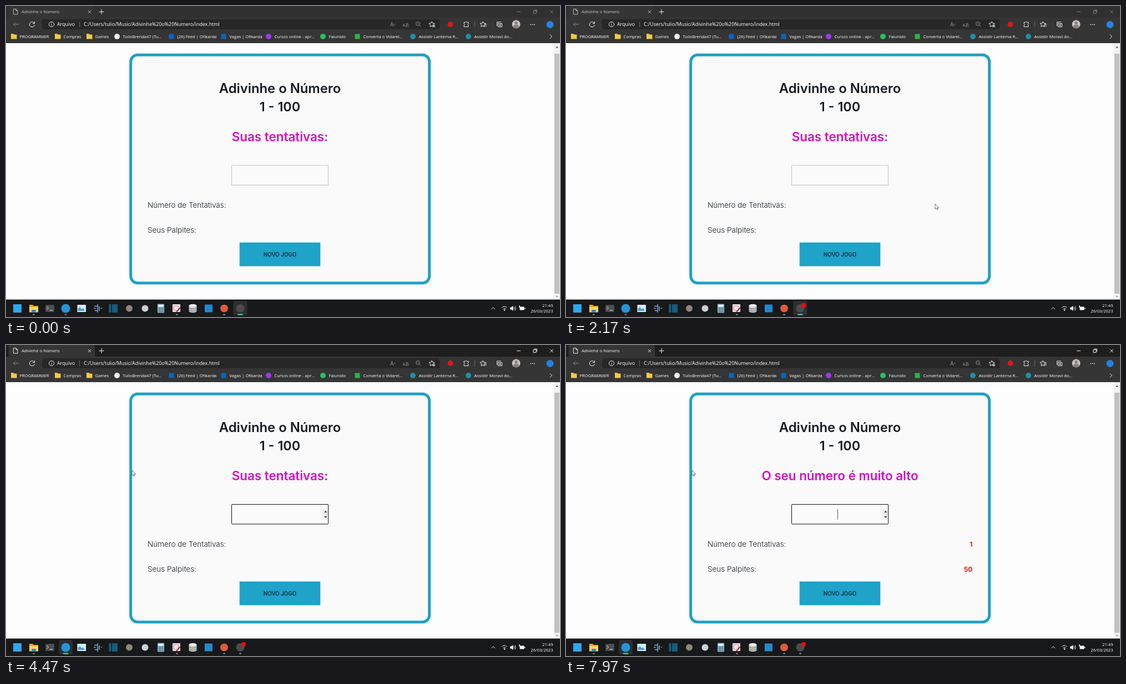
An HTML page that plays this animation: 998 px wide and 561 px high, repeating every 8000 ms.

```html
<!DOCTYPE html>
<html lang="pt">
<head>
<meta charset="utf-8">
<title>Adivinhe o Número</title>
<style>
  html, body { margin: 0; width: 100%; height: 100%; overflow: hidden; background: #fdfdfd; }
  svg { display: block; width: 100vw; height: 100vh; }
  text { white-space: pre; }
  .ui { font-family: "Open Sans", "Noto Sans", sans-serif; font-size: 7.6px; fill: #fff; }
  .page { font-family: Inter, sans-serif; fill: #141a22; }
  .mid { text-anchor: middle; }
  .line { fill: none; stroke: #eee; stroke-width: 1; }
  .dim { opacity: .45; }
  .label { font-size: 13.5px; font-weight: 300; }
  .value { font-size: 12.4px; font-weight: 600; fill: #e3060f; text-anchor: end; }
</style>
</head>
<body>
<svg viewBox="0 0 998 561">
  <!-- tab strip -->
  <rect id="strip" width="998" height="24"/>
  <path d="M3 22q2 0 2-3V4q0-4 4-4H156q4 0 4 4V19q0 3 3 3z" fill="#353535"/>
  <g class="ui">
    <g id="tabTitle">
      <path class="line" d="M13.500 5.500h4.500l3 3v6.500h-7.500zM18 5.500v3h3"/>
      <text x="28" y="13">Adivinhe o Número</text>
      <path class="line" d="M148 8l5 5m0-5l-5 5"/>
    </g>
    <path id="windowButtons" class="line" d="M920 10.500h7M950 8.500h5v5h-5zM951.500 7h5v5M980 7.500l6 6m0-6l-6 6"/>
  </g>
  <path class="line" d="M167.500 10.500h9M172 6v9"/>

  <!-- toolbar -->
  <rect y="21" width="998" height="46" fill="#353535"/>
  <rect x="65" y="24" width="716" height="18" rx="4" fill="#272727"/>
  <path class="line dim" d="M23 33H13.500m4-4l-4 4l4 4"/>
  <path class="line" d="M51 31a4.600 4.600 0 1 0 .5 3M51.500 28v3.500H48"/>
  <circle class="line" cx="82" cy="33" r="4.500"/>
  <path class="line" d="M82 32.500v3M82 30v1"/>
  <text class="ui" x="92" y="36.300" style="font-size:8.900px">Arquivo</text>
  <path d="M132.500 28v10M844.500 28v10" stroke="#666"/>
  <text class="ui" x="140" y="36.300" style="font-size:8.900px">C:/Users/tulio/Music/Adivinhe%20o%20Numero/index.html</text>
  <g opacity=".5">
    <text class="ui" x="692" y="37" style="font-size:10px">A<tspan dy="-2" font-size="7">»</tspan></text>
    <text class="ui" x="714" y="36.500" style="font-family:'Noto Sans CJK JP','Noto Sans CJK',sans-serif;font-size:8px">aあ</text>
    <circle class="line" cx="742" cy="32" r="3.500"/>
    <path class="line" d="M740.500 32h3M744.500 34.500l3 3"/>
  </g>
  <path id="star" class="line" d="M767 28l1.500 3l3.500.500l-2.500 2.500l.500 3.500l-3-1.700l-3 1.700l.500-3.500l-2.500-2.500l3.500-.500z"/>
  <use href="#star" x="92"/>
  <path class="line" d="M862 33h4M862 36h4"/>
  <circle cx="770.500" cy="36" r="2.500" fill="#aaa"/>
  <circle cx="800.500" cy="33" r="5" fill="#e2131b"/>
  <path class="line" d="M825 29.500h2.500q1.500-3 3 0h2.500v2.500q-3 1.500 0 3v2.500h-8v-2.500q3-1.500 0-3z"/>
  <path class="line" d="M886.500 31.500h7v6h-7zM884.500 36v-7h7M890 32.500v4M888 34.500h4"/>
  <circle cx="919" cy="33" r="7.500" fill="#c9c5c3"/>
  <path d="M913.500 38a5.500 4.500 0 0 1 11 0a7.500 7.500 0 0 1-11 0" fill="#85807e"/>
  <circle cx="919" cy="30.500" r="2.700" fill="#85807e"/>
  <path d="M944.500 33.500h1.600m1.700 0h1.600m1.700 0h1.600" stroke="#eee" stroke-width="1.600"/>
  <circle cx="980" cy="33.500" r="6.500" fill="#2583e0"/>
  <g id="bookmarks"></g>
  <path class="line" d="M980 51.500l3.500 3.500l-3.500 3.500"/>

  <!-- page -->
  <rect y="67" width="998" height="463" fill="#fdfdfd"/>
  <rect x="987" y="67" width="11" height="463" fill="#f1f1f1"/>
  <rect x="988" y="86" width="9" height="433" fill="#c1c1c1"/>
  <path d="M990 75.500l2.500-3l2.500 3z" fill="#555"/>
  <path d="M990 523l2.500 3l2.500-3z" fill="#aaa"/>
  <rect x="224.700" y="88.200" width="538" height="411.600" rx="12.500" fill="#fafafa" stroke="#1fa1c7" stroke-width="5"/>
  <g class="page">
    <g class="mid" font-weight="600">
      <text x="493.500" y="157" font-size="23.800">Adivinhe o Número</text>
      <text x="493.500" y="190" font-size="23.400">1 - 100</text>
      <text id="message" x="493.500" y="244" font-size="22.400" fill="#d60dc5"></text>
    </g>
    <rect id="field" x="406.500" y="287.500" width="174" height="35.500" fill="#fbfbfb"/>
    <text id="typed" class="mid" x="489" y="309.500" font-size="13"></text>
    <path id="caret" d="M489.500 296v19" stroke="#555"/>
    <g id="spinner">
      <rect x="571" y="296" width="9" height="19" fill="#efefef"/>
      <path d="M573 302l2.700-3l2.700 3zM573 309l2.700 3l2.700-3z" fill="#333"/>
    </g>
    <text class="label" x="255" y="364">Número de Tentativas:</text>
    <text class="label" x="255" y="409">Seus Palpites:</text>
    <g id="results">
      <text class="value" x="732.500" y="364">1</text>
      <text class="value" x="732.500" y="409">50</text>
    </g>
    <rect x="420.700" y="426.600" width="145.600" height="42.800" fill="#1fa3c8"/>
    <text class="mid" x="493.500" y="451.600" font-size="9.800" font-weight="500">NOVO JOGO</text>
  </g>

  <!-- taskbar -->
  <rect y="529.500" width="998" height="31.500" fill="#18191b"/>
  <rect id="activeTile" x="-12.500" y="532" width="25" height="26" rx="3" fill="#2d2e30"/>
  <rect x="13" y="538" width="15" height="15" fill="#2ea8ee"/>
  <path d="M42 539h6l2 2h8v11H42z" fill="#e5a823"/>
  <path d="M42 543h16v9.500H42z" fill="#ffd75e"/>
  <path d="M46 548h8v4.500h-8z" fill="#3486d2"/>
  <rect x="71" y="539" width="16" height="13" rx="1.500" fill="#4b4d4f"/>
  <path class="line" d="M73.500 542l3 3l-3 3M79 549h5"/>
  <circle cx="107.500" cy="545.500" r="8" fill="#2594d8"/>
  <rect x="128.500" y="539" width="15.500" height="13" fill="#d8eefa"/>
  <path d="M130 550v-4l3-3l3 4l3-2l3 5z" fill="#4a9bcc"/>
  <path d="M158 545.500h4m-3-4h6m-5 8h6M165 538v15m3-11v8m3-5h2" stroke="#7fa4d0" stroke-width="1.600"/>
  <path d="M185.500 538h4v15h-4zM191 538h10v15h-10z" fill="#155e7c"/>
  <circle cx="222" cy="545.500" r="6" fill="#8b877e"/>
  <circle cx="250.500" cy="545.500" r="6" fill="#d0d0d2"/>
  <rect x="273" y="537.500" width="12" height="16" rx="1" fill="#8fb4cb"/>
  <rect x="274.500" y="539" width="9" height="3.500" fill="#e9f5fb"/>
  <path d="M275 545h8.500M275 548h8.500M275 551h8.500" stroke="#24516f" stroke-width="1.600" stroke-dasharray="2 1.200"/>
  <rect x="300" y="538" width="14" height="14" rx="1" fill="#e9e9ee"/>
  <path d="M302 541h9v8h-9z" fill="none" stroke="#d63b42" stroke-dasharray="2 1"/>
  <path d="M307 552l7-8" stroke="#b22c43" stroke-width="2"/>
  <path d="M329.500 540.500v10a7 2.800 0 0 0 14 0v-10z" fill="#c4c4c4"/>
  <ellipse cx="336.500" cy="540.500" rx="7" ry="2.800" fill="#eee"/>
  <path d="M329.500 544a7 2.500 0 0 0 14 0m-14 4a7 2.500 0 0 0 14 0" fill="none" stroke="#777"/>
  <rect x="358" y="538.500" width="14" height="14" fill="#2489ca"/>
  <circle cx="393" cy="545.500" r="7" fill="#df5a3d"/>
  <circle cx="422" cy="545.500" r="7.500" fill="#4b4b4e"/>
  <circle id="recording" cx="428" cy="540" r="4" fill="#ff0a12"/>
  <g id="running" fill="#999"></g>
  <rect id="activeBar" x="-5" y="555.500" width="10" height="2.200" rx="1" fill="#3ed292"/>
  <path class="line" d="M874.500 547l3.200-3.200l3.200 3.200"/>
  <path class="line" d="M893.500 544q4.500-4 9 0M895.500 546.500q2.500-2.300 5 0"/>
  <circle cx="898" cy="548.500" r="1.200" fill="#fff"/>
  <path d="M908 543.500h2.500l3-2.500v9l-3-2.500H908z" fill="#fff"/>
  <path class="line" d="M915 543.500q1.500 2 0 4M916.800 541.500q3 4 0 8"/>
  <rect x="925.500" y="542.500" width="8" height="6" rx="1" fill="#fff"/>
  <path d="M934 544.500h1.500v2H934z" fill="#fff"/>
  <path d="M925 540v4" stroke="#fff" stroke-width="1.500"/>
  <g class="ui" text-anchor="end">
    <text x="985.500" y="542.500">21:49</text>
    <text x="985.500" y="553">26/03/2023</text>
  </g>

  <!-- pointers -->
  <path id="arrow" d="M0 0v9.500l2.200-2l1.500 3.200l1.500-.700l-1.500-3h3z" fill="#fff" stroke="#333" stroke-width=".7"/>
  <path id="beam" d="M-2-4.500h1.300l.700.700l.700-.700H2M0-4v8M-2 4.500h1.300l.700-.700l.700.700H2" fill="none" stroke="#777" stroke-width=".8"/>
</svg>
<script>
const LOOP = 8000, RECORD = 350, FOCUS = 3500, KEYS = [5000, 5220], SUBMIT = 5700, BLINK = 500;
// Pointer tip: time, x, y
const PATH = [[1750, 1000, 410], [2170, 665, 357], [2800, 486, 305], [3620, 486, 305], [4150, 227, 226]];
const $ = id => document.getElementById(id);
const show = (id, on) => $(id).setAttribute('visibility', on ? 'visible' : 'hidden');
const move = (id, x, y = 0) => $(id).setAttribute('transform', `translate(${x} ${y})`);

const folder = x => `<path d="M${x - 5} 50h4l1.500 1.500h5v8h-10.500z" fill="#f4c84c"/>`;
const disc = color => x => `<circle cx="${x}" cy="55" r="5" fill="${color}"/>`;
const square = color => x => `<rect x="${x - 4.5}" y="50.500" width="9" height="9" fill="${color}"/>`;
const bookmarks = [
  [14, folder, 'PROGRAMMER'], [93, folder, 'Compras'], [150, folder, 'Games'],
  [200, disc('#f4f4f4'), 'TulioBrenda47 (Tu...'],
  [298, square('#0a66c2'), '(26) Feed | Ofikarda'],
  [392, square('#0a66c2'), 'Vagas | Ofikarda'],
  [473, disc('#a435f0'), 'Cursos online - apr...'],
  [571, disc('#25c15b'), 'Falunido'],
  [633, square('#2fb344'), 'Converta o Vidarel...'],
  [733, disc('#1e8fae'), 'Assistir Lanterna R...'],
  [833, disc('#1e8fae'), 'Assistir Moravi do...']
];
$('bookmarks').innerHTML = bookmarks.map(([x, icon, name]) =>
  icon(x) + `<text class="ui" x="${x + 10.5}" y="57.800">${name}</text>`).join('');
$('running').innerHTML = [50, 107.5, 308, 393, 422].map(x =>
  `<rect x="${x - 2}" y="555.800" width="4" height="1.800" rx=".9"/>`).join('');

function pointerAt(t) {
  const next = PATH.findIndex(p => p[0] > t);
  if (next < 0) return PATH[PATH.length - 1].slice(1);
  if (next === 0) return null;
  const [t0, x0, y0] = PATH[next - 1], [t1, x1, y1] = PATH[next];
  const u = (t - t0) / (t1 - t0), e = u * u * (3 - 2 * u);
  return [x0 + (x1 - x0) * e, y0 + (y1 - y0) * e];
}

function draw(t) {
  const focused = t >= FOCUS, submitted = t >= SUBMIT;
  const typed = submitted ? '' : '50'.slice(0, KEYS.filter(k => t >= k).length);
  const lastInput = [FOCUS, ...KEYS, SUBMIT].filter(k => t >= k).pop();
  const pointer = pointerAt(t);
  const hover = !!pointer && pointer[0] > 406 && pointer[0] < 581 && pointer[1] > 287 && pointer[1] < 323;

  $('strip').setAttribute('fill', focused ? '#1e1e1e' : '#303030');
  $('tabTitle').setAttribute('opacity', focused ? 1 : .75);
  $('windowButtons').setAttribute('opacity', focused ? 1 : .4);
  const task = focused ? 107.5 : 422;
  move('activeTile', task);
  move('activeBar', task);
  show('recording', t >= RECORD);

  $('field').setAttribute('stroke', focused ? '#101014' : '#c0c0cc');
  $('field').setAttribute('rx', focused ? 1.5 : 0);
  $('typed').textContent = typed;
  move('caret', typed.length * 4);
  show('caret', focused && Math.floor((t - lastInput) / BLINK) % 2 === 0);
  show('spinner', focused || hover);
  $('message').textContent = submitted ? 'O seu número é muito alto' : 'Suas tentativas:';
  show('results', submitted);

  show('arrow', pointer && !hover);
  show('beam', hover);
  if (pointer) move(hover ? 'beam' : 'arrow', ...pointer);
}

function frame() {
  draw(performance.now() % LOOP);
  requestAnimationFrame(frame);
}
frame();
</script>
</body>
</html>
```
